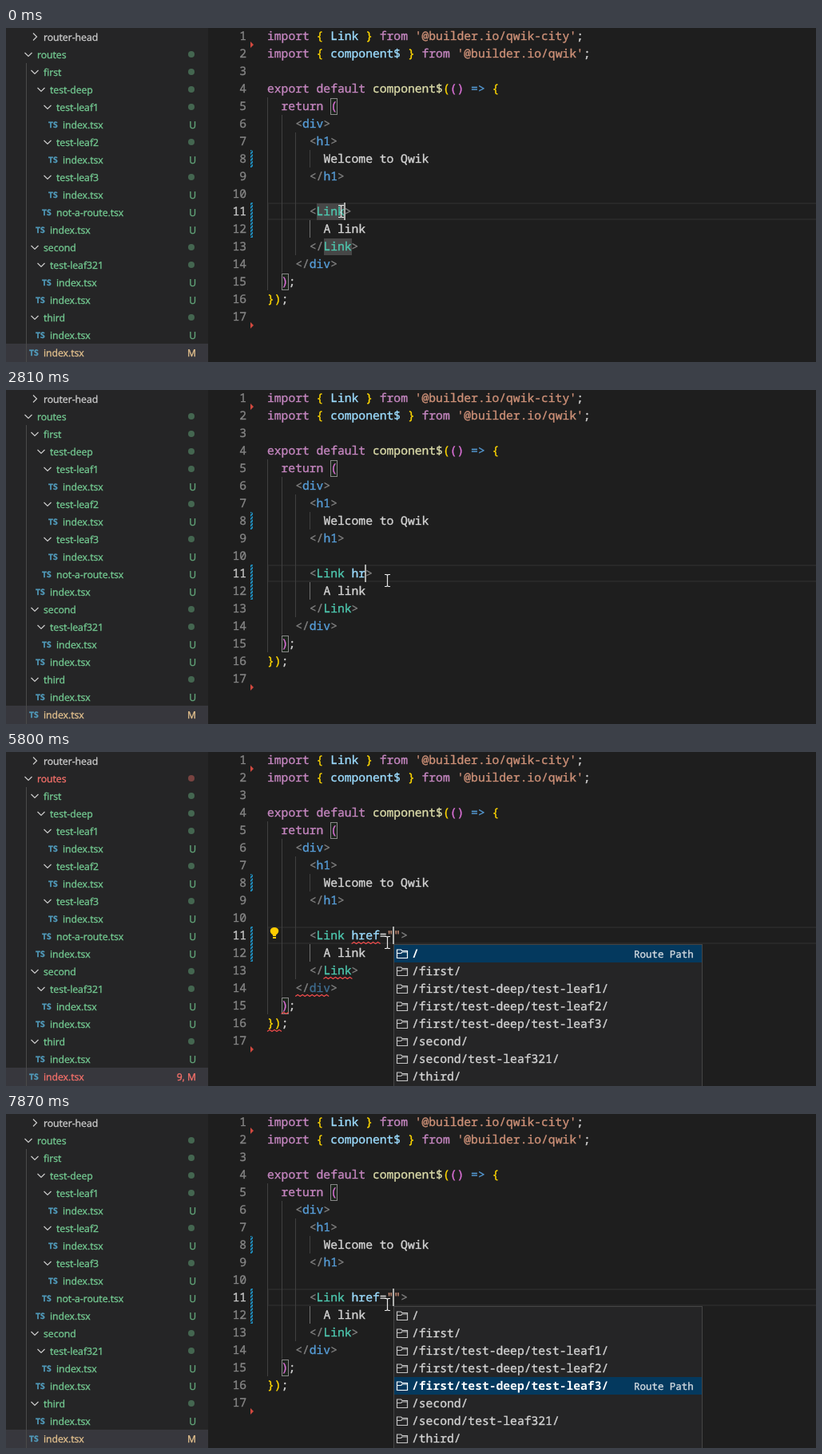
Write an HTML page that moves like this. It is 1014 by 419 pixels and loops after 8 s.

```html
<!DOCTYPE html>
<html lang="en">
<head>
<meta charset="utf-8">
<title>Typed route links</title>
<style>
html, body { margin: 0; width: 100%; height: 100%; overflow: hidden; background: #1e1e1e; }
svg { display: block; width: 1014px; height: 419px; }
text { white-space: pre; text-rendering: geometricPrecision; stroke-width: .35px; }
.code { font: 14.66px "Noto Sans Mono", "DejaVu Sans Mono", monospace; }
.small { font: 12.46px "Noto Sans Mono", "DejaVu Sans Mono", monospace; }
.ui { font: 12.2px "Open Sans", "Noto Sans", sans-serif; }
.ts { font: 700 10.3px "Open Sans", "Noto Sans", sans-serif; }
.doc { font: italic 15.3px "Open Sans", "Noto Sans", sans-serif; }
.strong { font-weight: 700; stroke-width: 0; }
</style>
</head>
<body>
<svg viewBox="0 0 1014 419">
  <defs>
    <pattern id="hatch" width="3" height="3" patternUnits="userSpaceOnUse" patternTransform="rotate(-45)">
      <rect width="3" height="2" fill="#1f8fc0"/>
    </pattern>
  </defs>
  <g id="base"></g>
  <g id="live"></g>
</svg>
<script>
const LOOP = 8000, LINE = 22, LEFT = 327, CHAR = 8.797;
const COLORS = {
  k: '#c586c0', v: '#9cdcfe', s: '#ce9178', d: '#d4d4d4', f: '#dcdcaa', b: '#569cd6', p: '#808080',
  t: '#4ec9b0', g: '#ffd700', o: '#da70d6', r: '#f44747', m: '#2aaaff', w: '#ffffff', x: '#3f6c8f'
};
const STRONG = 'mw';
const GREEN = '#73c991', ERROR = '#f4706a', MODIFIED = '#e2c08d', WIDGET = '#252526';

const base = document.getElementById('base'), live = document.getElementById('live');
const esc = s => s.replace(/&/g, '&amp;').replace(/</g, '&lt;');
const colX = col => LEFT + col * CHAR;
const lineTop = n => LINE * (n - 1) - 1;
const rect = (x, y, w, h, fill, more = '') => `<rect x="${x}" y="${y}" width="${w}" height="${h}" fill="${fill}" ${more}/>`;
const box = (x, y, w, h, fill, stroke) => rect(x + .5, y + .5, w - 1, h - 1, fill, `stroke="${stroke}"`);
const path = (d, stroke, more = '') => `<path d="${d}" fill="none" stroke="${stroke}" ${more}/>`;
const text = (cls, x, y, fill, s, more = '') =>
  `<text class="${cls}" x="${x}" y="${y}" fill="${fill}" stroke="${fill}" ${more}>${esc(s)}</text>`;
const icon = (x, y, d, stroke) => path(d, stroke, `transform="translate(${x} ${y})" stroke-width="1.2"`);

// Markup: "~" plus a colour key starts each run of text.
function runs(markup, x, y) {
  let col = 0;
  return markup.split('~').slice(1).map(part => {
    const s = part.slice(1), at = x + col * CHAR;
    col += s.length;
    return text(STRONG.includes(part[0]) ? 'code strong' : 'code', at.toFixed(2), y, COLORS[part[0]], s);
  }).join('');
}
const codeLine = (n, indent, markup) => runs(markup, colX(indent), lineTop(n) + 16);

// Sidebar: [depth, label, kind], kind "+" open folder, ">" closed folder, else a badge.
const TREE = [
  [1, 'router-head', '>'], [0, 'routes', '+'], [1, 'first', '+'], [2, 'test-deep', '+'],
  [3, 'test-leaf1', '+'], [4, 'index.tsx', 'U'], [3, 'test-leaf2', '+'], [4, 'index.tsx', 'U'],
  [3, 'test-leaf3', '+'], [4, 'index.tsx', 'U'], [3, 'not-a-route.tsx', 'U'], [2, 'index.tsx', 'U'],
  [1, 'second', '+'], [2, 'test-leaf321', '+'], [3, 'index.tsx', 'U'], [2, 'index.tsx', 'U'],
  [1, 'third', '+'], [2, 'index.tsx', 'U'], [1, 'index.tsx', 'M']
];
const ROUTES_ROW = 1, ACTIVE_ROW = 18;

function treeRow(row, color, badge) {
  const [depth, label, kind] = TREE[row];
  const x = 39 + 8 * depth, mid = row * LINE + 11, y = mid + 5;
  let out = text('ui', x, y, color, label);
  if (kind === '>') return out + icon(x - 11, mid, 'M-2 -4.5L2.5 0L-2 4.5', '#cccccc');
  if (kind === '+') {
    return out + icon(x - 11, mid, 'M-4.5 -2L0 2.5L4.5 -2', '#cccccc') +
      `<circle cx="232" cy="${mid}" r="4" fill="${color}" opacity=".4"/>`;
  }
  out += text('ts', x - 18, mid + 4, '#519aba', 'TS');
  return out + text('ui', 238, y, color, badge || kind, `text-anchor="end" opacity="${badge ? 1 : .8}"`);
}

function drawBase() {
  let out = rect(0, 0, 1014, 419, '#1e1e1e') + rect(0, 0, 253, 419, WIDGET) + rect(0, 396, 253, 23, '#37373d');
  out += path('M25.5 44V419', '#4a4a4a');
  TREE.forEach(([, , kind], row) => {
    if (row !== ROUTES_ROW && row !== ACTIVE_ROW) out += treeRow(row, kind === '>' ? '#cccccc' : GREEN);
  });

  out += path('M1014 220H328V240H1014', '#282828', 'stroke-width="2"');
  for (let n = 1; n <= 17; n++) {
    out += text('code', 301, lineTop(n) + 16, n === 11 ? '#c6c6c6' : '#858585', n + '', 'text-anchor="end"');
  }
  for (const [from, to] of [[8, 9], [11, 13]]) {
    out += rect(306, lineTop(from), 3, (to - from) * LINE, 'url(#hatch)');
  }
  for (const y of [21, 373]) out += `<path d="M306 ${y - 4}V${y + 4}L310 ${y}Z" fill="#d1493f"/>`;

  const guide = (x, from, to, color) => path(`M${x}.5 ${lineTop(from)}V${lineTop(to + 1)}`, color);
  out += guide(327, 5, 15, '#404040') + guide(345, 6, 14, '#404040') + guide(362, 7, 13, '#404040') +
    guide(380, 8, 8, '#404040') + guide(380, 12, 12, '#707070');
  out += box(406, 88, 9, 21, '#1c251c', '#888888') + box(345, 308, 9, 21, '#1c251c', '#888888');

  out += codeLine(1, 0, "~kimport ~g{ ~vLink ~g} ~kfrom ~s'@builder.io/qwik-city'~d;") +
    codeLine(2, 0, "~kimport ~g{ ~vcomponent$ ~g} ~kfrom ~s'@builder.io/qwik'~d;") +
    codeLine(4, 0, '~kexport default ~fcomponent$~g(~o() ~b=> ~g{') +
    codeLine(5, 2, '~kreturn ~o(') +
    codeLine(6, 4, '~p<~bdiv~p>') +
    codeLine(7, 6, '~p<~bh1~p>') +
    codeLine(8, 8, '~dWelcome to Qwik') +
    codeLine(9, 6, '~p</~bh1~p>');
  base.innerHTML = out;
}

// Linear interpolation through [time, value...] keys.
function track(keys, t) {
  const i = keys.findIndex(k => k[0] > t);
  if (i === 0) return keys[0].slice(1);
  if (i < 0) return keys[keys.length - 1].slice(1);
  const a = keys[i - 1], b = keys[i], p = (t - a[0]) / (b[0] - a[0]);
  return a.slice(1).map((v, j) => v + (b[j + 1] - v) * p);
}
const during = (t, from, to) => t >= from && t < to;

const CARET = [
  [30, 1], [250, 0], [460, 0], [680, 1], [1030, 1], [1210, 0], [1420, 0], [1640, 1], [1990, 1], [2180, 0],
  [2439, 0], [2440, 1], [3890, 1], [4090, 0], [4369, 0], [4370, 1], [5050, 1], [5260, 0], [5509, 0], [5510, 1],
  [6200, 1], [6450, 0], [6730, 0], [6960, 1], [7210, 1], [7430, 0], [7660, 0], [7860, 1]
];
const MOUSE = [[1390, 419, 230], [1480, 440, 233], [1640, 477, 239]];
const KEYS = [2440, 2640, 2810, 3010, 3210, 4370, 5510];
const PICKS = [6820, 7300, 7400, 7700];
const ROUTES = ['/', '/first/', '/first/test-deep/test-leaf1/', '/first/test-deep/test-leaf2/',
  '/first/test-deep/test-leaf3/', '/second/', '/second/test-leaf321/', '/third/'];
const CUBE = 'M-6.5 -1.5L.5 -5.5L6.5 -2.5V2.5L-.5 5.5L-6.5 3ZL-.5 1.5L6.5 -2.5M-.5 1.5V5.5';
const FOLDER = 'M-6.5 -5H-1.5L0 -3.5H6.5V5.5H-6.5ZM-6.5 -.5H-1.5L0 -2H6.5';
const IBEAM = 'M-3.5 -7.5H-1L0 -6.5L1 -7.5H3.5M0 -6.5V6.5M-3.5 7.5H-1L0 6.5L1 7.5H3.5';

function squiggle(n, from, to) {
  const y = lineTop(n) + 21.5;
  let d = `M${colX(from).toFixed(1)} ${y}`;
  for (let x = colX(from) + 3, up = true; x <= colX(to) + 1; x += 3, up = !up) d += `L${x.toFixed(1)} ${up ? y - 2 : y}`;
  return path(d, '#f14c4c', 'stroke-width="1.2"');
}

function hover(opacity) {
  return `<g opacity="${opacity}">` + box(389, 134, 370, 85, WIDGET, '#454545') + path('M390 187.5H758', '#454545') +
    runs('~d(alias) ~bconst ~vLink~d: ~tComponent~d<~tLinkProps~d>', 398, 155) +
    runs('~kimport ~vLink', 398, 177) + text('doc', 398, 209, '#cccccc', '@alpha') + '</g>';
}

function suggest(col, rows, selected, glyph, textX, detailX, detail) {
  const x = Math.round(colX(col));
  let out = box(x, 241, 387, rows.length * LINE + 4, WIDGET, '#454545') +
    rect(x + 1, 242 + selected * LINE, 385, LINE, '#04395e');
  rows.forEach((markup, i) => {
    const mid = 253 + i * LINE, on = i === selected;
    const idle = glyph === CUBE ? '#75beff' : '#c5c5c5';
    out += icon(x + 11, mid, glyph, on ? '#ffffff' : idle) +
      runs(on ? markup.replace(/~d/g, '~w') : markup, x + textX, mid + 5);
    if (on) out += text('small', x + detailX, mid + 5, '#d4dbe1', detail);
  });
  return out;
}

function bulb() {
  return '<path d="M334 229.5C328.5 226 330.5 220 336 220S343.5 226 338 229.5V231H334Z" fill="#ffcc00"/>' +
    rect(334, 232, 4, 2, '#ffcc00');
}

function codeTail(t, typed) {
  const attr = 'href'.slice(0, Math.max(0, Math.min(typed - 1, 4)));
  const gap = typed ? ' ' : '', equals = typed >= 6, quoted = typed >= 7;
  const broken = during(t, 4400, 5510), dim = during(t, 5510, 6250);
  let tag = '~p<~tLink~v' + gap + attr;
  if (broken) tag += '~r=>';
  else tag += (equals ? '~d=' : '') + (quoted ? '~s""' : '') + '~p>';
  const out = codeLine(11, 6, tag);
  if (broken) {
    return out + codeLine(12, 8, '~vA link') + codeLine(13, 6, '~r</Link>') + codeLine(14, 4, '~r</div>') +
      codeLine(15, 2, '~o)~r;') + codeLine(16, 0, '~g})~r;');
  }
  return out + codeLine(12, 8, '~dA link') + codeLine(13, 6, '~p</~tLink~p>') +
    codeLine(14, 4, dim ? '~p</~xdiv~p>' : '~p</~bdiv~p>') + codeLine(15, 2, '~o)~d;') + codeLine(16, 0, '~g})~d;');
}

function drawLive(t) {
  const typed = KEYS.filter(k => t >= k).length;
  const caretCol = 11 + typed;
  const failing = during(t, 3790, 6450);
  const badge = !failing ? 'M' : t < 4900 ? '1, M' : '9, M';

  let out = treeRow(ROUTES_ROW, failing ? ERROR : GREEN) + treeRow(ACTIVE_ROW, failing ? ERROR : MODIFIED, badge);
  if (!typed) out += rect(389, 220, 35, 21, '#474747') + rect(398, 264, 35, 21, '#474747');
  out += codeTail(t, typed);

  if (during(t, 3450, 6250)) out += squiggle(11, 12, 16);
  if (during(t, 4780, 5510)) out += squiggle(11, 17, 18);
  if (during(t, 4780, 6250)) {
    out += squiggle(13, 8, 12) + squiggle(14, 4, 9) + squiggle(15, 2, 3) + squiggle(16, 0, 2);
  }
  if (during(t, 4640, 6250)) out += bulb();

  const caretX = Math.floor(colX(caretCol) - .5);
  out += rect(caretX, 219, 2, LINE, '#aeafad', `opacity="${track(CARET, t)[0].toFixed(3)}"`);

  if (during(t, 30, 1480)) out += hover(Math.min(1, (t - 30) / 110).toFixed(3));
  if (during(t, 3120, 4440)) {
    const match = typed >= 5 ? '~mhref' : '~mhre~df';
    out += suggest(caretCol, [match + '~d?', match + '~dLang?'], 0, CUBE, 22.5, 129,
      '(property) href?: string | unde…');
  }
  if (t >= 5640) {
    out += suggest(18, ROUTES.map(r => '~d' + r), PICKS.filter(p => t >= p).length, FOLDER, 23, 301, 'Route Path');
  }

  const [mx, my] = track(MOUSE, t).map(Math.round);
  return out + icon(mx + .5, my, IBEAM, '#e8e8e8');
}

let shown = '';
function frame(now) {
  const next = drawLive(now % LOOP);
  if (next !== shown) live.innerHTML = shown = next;
  requestAnimationFrame(frame);
}
drawBase();
frame(0);
</script>
</body>
</html>
```
